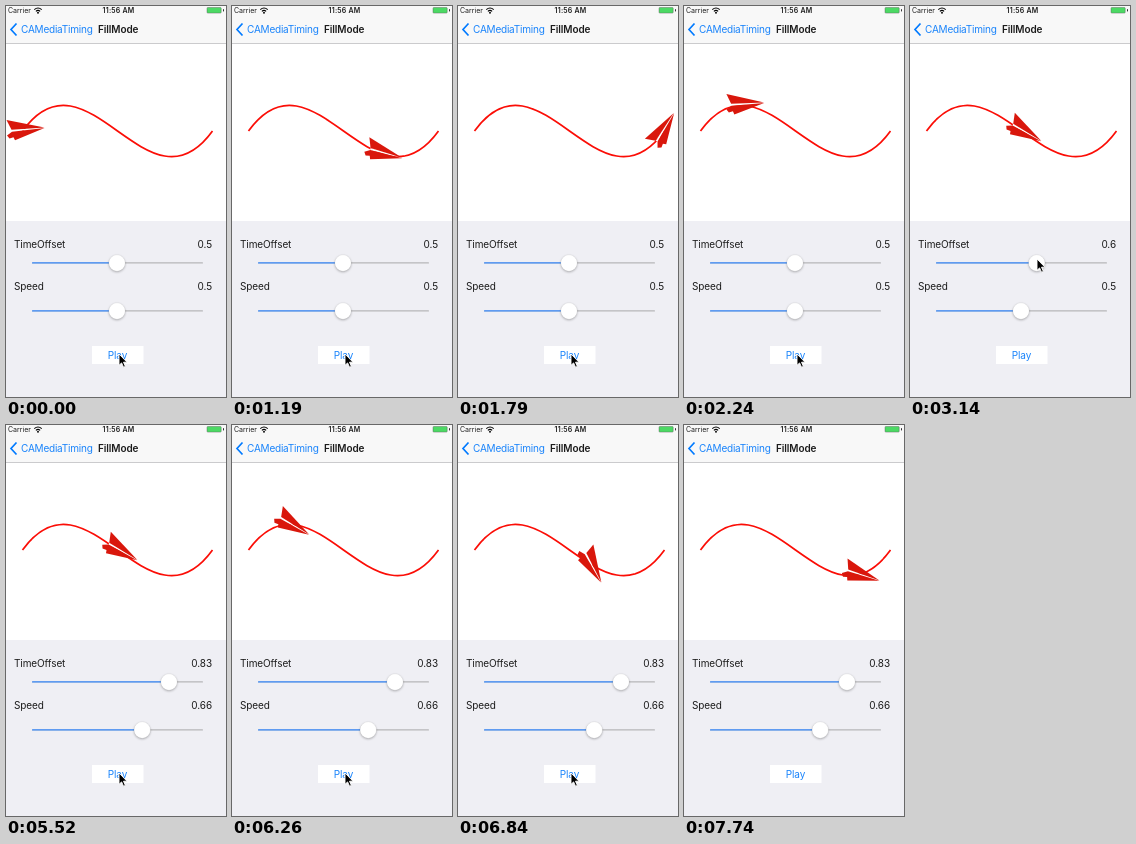
Recreate the animation shown at these times as an HTML page. Size 220 px wide and 391 px high, loop 8490 ms.

```html
<!DOCTYPE html>
<html lang="en">
<head>
<meta charset="utf-8">
<title>FillMode</title>
<style>
  html, body { margin: 0; width: 100%; height: 100%; overflow: hidden; background: #fff; }
  svg { display: block; width: 220px; height: 391px; }
  text { font: 10px Inter, Roboto, sans-serif; letter-spacing: -.1px; fill: #1c1c1c; }
  .status { font-size: 7px; letter-spacing: 0; }
  .bold { font-weight: 600; }
  .blue { fill: #1a84fb; }
  .end { text-anchor: end; }
  .mid { text-anchor: middle; }
  .thumb { fill: #fff; stroke: #0000001a; stroke-width: .5; filter: drop-shadow(0 1.5px 1.2px #0004); }
</style>
</head>
<body>
<svg viewBox="0 0 220 391">
  <rect width="220" height="391" fill="#fff"/>
  <rect width="220" height="37" fill="#f8f8f8"/>
  <rect y="37" width="220" height=".7" fill="#b5b5b8"/>
  <rect y="215" width="220" height="176" fill="#efeff4"/>

  <text class="status" x="2" y="7">Carrier</text>
  <g fill="none" stroke="#000" stroke-width="1.1">
    <path d="M28.3 3.6Q32 .4 35.7 3.6M29.9 5.3Q32 3.4 34.1 5.3"/>
    <circle cx="32" cy="6.7" r=".4"/>
  </g>
  <text class="status bold mid" x="112.5" y="7" style="letter-spacing:.2px">11:56 AM</text>
  <rect x="201" y="1.5" width="14.2" height="5.6" rx=".8" fill="#4cd964" stroke="#555" stroke-width=".4"/>
  <rect x="217" y="3.2" width="1" height="2.2" fill="#333"/>

  <path d="M10.5 17.5 5 23.5 10.5 29.5" fill="none" stroke="#007aff" stroke-width="1.7"/>
  <text class="blue" x="15" y="27" style="letter-spacing:-.22px">CAMediaTiming</text>
  <text class="bold" x="92" y="27">FillMode</text>

  <path d="M16.5 125C81 36 142 214 206.5 125" fill="none" stroke="#fb0d06" stroke-width="1.7"/>
  <g id="plane" fill="#d9170c">
    <path d="M-11-1.2 22-3.2-10.5 1z" fill="#fff"/>
    <path d="M-16-11 22-3.4-11-1.2z"/>
    <path d="M-15.5 4.5-10.5.7 22-3-7.5 9.3-9 6.3-13 7.5z"/>
  </g>

  <text x="8" y="242">TimeOffset</text>
  <text x="8" y="284">Speed</text>
  <g id="sliders"></g>

  <rect x="86" y="340" width="51.5" height="18" fill="#fff"/>
  <text id="play" class="blue mid" x="111.5" y="353">Play</text>
  <path id="cursor" d="M0 0V11.3L2.6 8.9 4.5 13.2 6.4 12.4 4.5 8.2H8z" stroke="#fff" stroke-width=".9"/>
</svg>
<script>
const LOOP = 8490, STEP = LOOP / 57;
const $ = id => document.getElementById(id);

$("sliders").innerHTML = [257, 305].map(y => `
  <text class="end" x="206" y="${y - (y < 300 ? 15 : 21)}"></text>
  <rect x="26" y="${y - .8}" width="171" height="1.3" rx=".6" fill="#b7b7b9"/>
  <rect x="26" y="${y - .8}" height="1.3" rx=".6" fill="#3f8fff"/>
  <circle class="thumb" cy="${y}" r="8.2"/>`).join("");
const labels = document.querySelectorAll("#sliders text");
const fills = document.querySelectorAll("#sliders rect:nth-of-type(even)");
const thumbs = document.querySelectorAll(".thumb");

// keys: [time, value, value...], linear in between
function track(keys, time) {
  const i = keys.findIndex(k => k[0] > time);
  if (i < 0) return keys[keys.length - 1].slice(1);
  if (!i) return keys[0].slice(1);
  const a = keys[i - 1], b = keys[i], p = (time - a[0]) / (b[0] - a[0]);
  return a.slice(1).map((v, n) => v + (b[n + 1] - v) * p);
}

const offsetKeys = [[2700, .5], [2830, .55], [2978, .65], [3128, .6], [3277, .6],
  [3426, .5], [3575, .7], [3724, .83]];
const speedKeys = [[4468, .5], [4915, .66]];
const cursorKeys = [[2690, 113, 348], [2830, 119, 254], [2978, 135, 253], [3128, 127, 253],
  [3277, 127, 253], [3426, 112, 253], [3575, 142, 252], [3724, 163, 252], [3880, 163, 252],
  [4320, 117, 294], [4468, 112, 302], [4915, 137, 303], [5065, 137, 303],
  [5511, 113, 348], [7450, 113, 348], [7594, 121, 360]];

function bezier(t) {
  const u = 1 - t;
  const mix = (a, b, c, d) => u * u * u * a + 3 * u * u * t * b + 3 * u * t * t * c + t * t * t * d;
  const slope = (a, b, c, d) => u * u * (b - a) + 2 * u * t * (c - b) + t * t * (d - c);
  const xs = [16.5, 81, 142, 206.5], ys = [125, 36, 214, 125];
  return { x: mix(...xs), y: mix(...ys),
    angle: Math.atan2(slope(...ys), slope(...xs)) * 180 / Math.PI };
}

// one full lap of the path that begins and ends at the time offset
function flight(time, start, offset, speed) {
  const lap = Math.min(1, Math.max(0, (time - start) * speed / 1000));
  return bezier((offset + lap) % 1);
}

function pose(time) {
  if (time < 740) return { x: 16.5, y: 125, angle: 0 };
  if (time < 5800) return flight(time, 800, .5, .5);
  const p = flight(time, 5675, .83, .66);
  p.angle += bezier(.5).angle;   // keeps the turn left by the first flight
  return p;
}

function setSlider(i, value) {
  const x = 32.2 + 157.6 * value;
  labels[i].textContent = +value.toFixed(2);
  fills[i].setAttribute("width", x - 26);
  thumbs[i].setAttribute("cx", x);
}

function draw(now) {
  const time = Math.floor((now % LOOP + 14) / STEP) * STEP;
  const p = pose(time);
  $("plane").setAttribute("transform", `translate(${p.x} ${p.y}) rotate(${p.angle})`);
  setSlider(0, track(offsetKeys, time)[0]);
  setSlider(1, track(speedKeys, time)[0]);
  const pressed = [740, 5800].some(t => time >= t && time < t + 140);
  $("play").setAttribute("opacity", pressed ? .3 : 1);
  $("cursor").setAttribute("transform", `translate(${track(cursorKeys, time)})`);
  $("cursor").setAttribute("visibility", time > 7700 ? "hidden" : "visible");
}

const begin = performance.now();
function tick() {
  draw(performance.now() - begin);
  requestAnimationFrame(tick);
}
tick();
</script>
</body>
</html>
```
